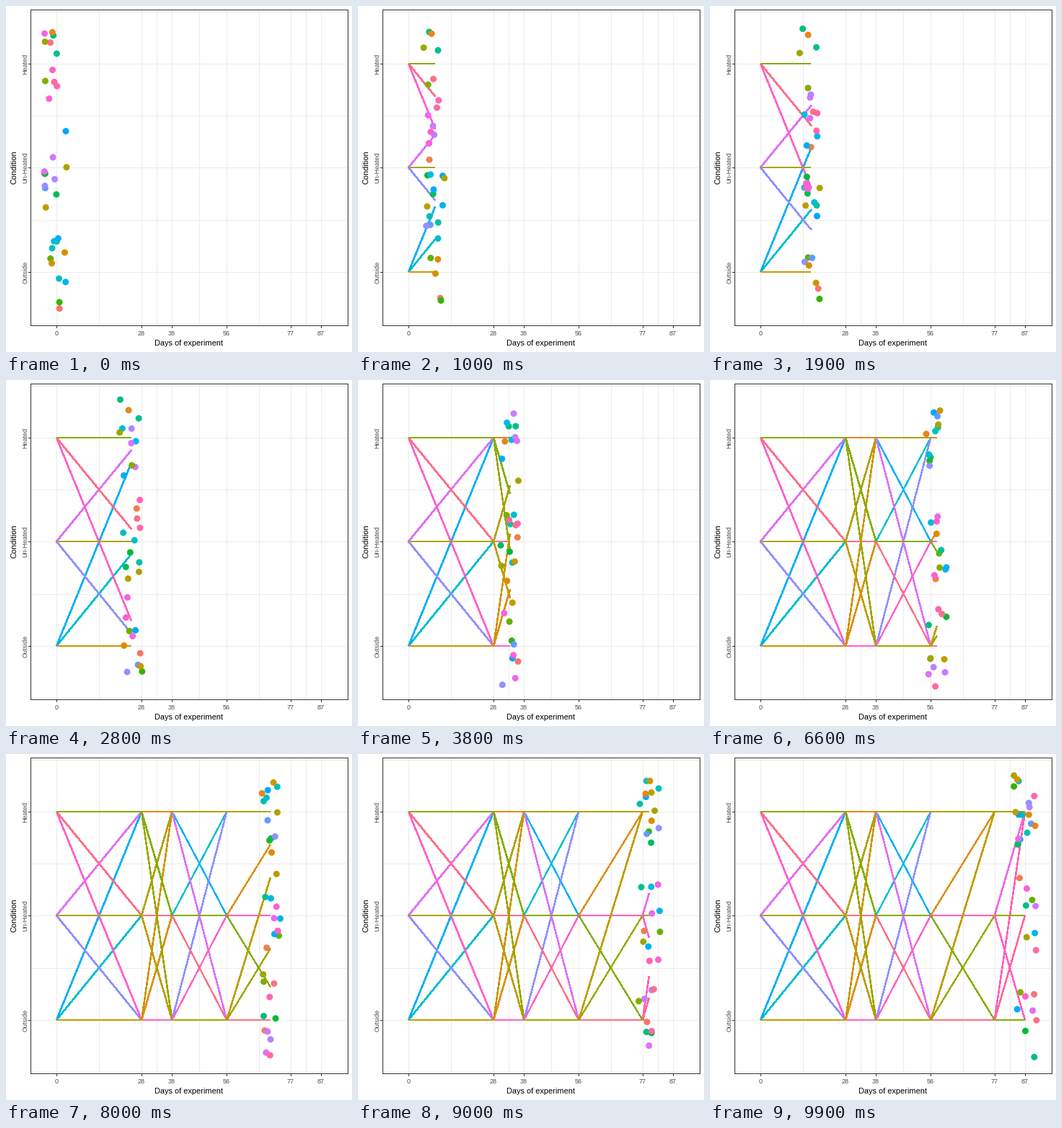
A matplotlib script that plays this animation: 480x480 px, repeating every 10 s.

```python
from itertools import permutations

import numpy as np
import matplotlib.pyplot as plt
from matplotlib.animation import FuncAnimation
from matplotlib.collections import LineCollection
from matplotlib.patches import Rectangle

SIZE, DPI, FRAMES = 480, 80, 100
PT = 72 / DPI  # points per pixel
VISITS = np.array([0, 28, 38, 56, 77, 87])
LEGS = range(len(VISITS) - 1)
ROWS = {"O": 369, "U": 224, "H": 80}
NAMES = {"O": "Outside", "U": "Un-Heated", "H": "Heated"}
LEFT, RIGHT, TOP, BOTTOM = 34, 474, 5, 443


def day_x(day):
    return 70 + 367 / 87 * np.asarray(day, float)


def make_paths():
    """Condition of every subject at the six visits, by cohort."""
    fixed = [c * 6 for c in "OUH"]
    late = [a * 3 + b * 3 for a, b in permutations("OUH", 2)]
    early, crossed = [], []
    for a, b, c in permutations("OUH"):
        end = "H" if b == "H" else c  # heated ones stay heated
        early.append(a * 2 + b * 2 + end * 2)
        last = "HHH" if c == "H" else "HUO"
        crossed += [a + b * 2 + c * 2 + d for d in last]
    return fixed + early + late + crossed


def hcl(hue, chroma=100, lum=65):
    """Polar LUV colour as sRGB."""
    h = np.radians(hue)
    u = chroma * np.cos(h) / (13 * lum) + 0.1978
    v = chroma * np.sin(h) / (13 * lum) + 0.4683
    y = ((lum + 16) / 116) ** 3
    x = 9 * y * u / (4 * v)
    z = -x / 3 - 5 * y + 3 * y / v
    rgb = np.array([
        3.2405 * x - 1.5371 * y - 0.4985 * z,
        -0.9693 * x + 1.8760 * y + 0.0416 * z,
        0.0556 * x - 0.2040 * y + 1.0572 * z,
    ]).clip(0, 1)
    return np.where(rgb > 0.00304, 1.055 * rgb ** (1 / 2.4) - 0.055, 12.92 * rgb)


paths = make_paths()
count = len(paths)
order = [0, 1, *range(9, count), *range(2, 9)]  # bottom to top
colors = np.array([hcl(15 + 360 * i / count) for i in order])
visit_x = day_x(VISITS)
levels = np.array([[ROWS[c] for c in paths[i]] for i in order], float)

# Dots: jittered around each visit, straight moves in between
rng = np.random.default_rng(7)
spots = np.stack([
    visit_x + rng.uniform(-16.9, 16.9, levels.shape),
    levels + rng.uniform(-57.8, 57.8, levels.shape),
], axis=-1)


def line_width(k, row):
    slope = abs(row[k + 1] - row[k]) / (visit_x[k + 1] - visit_x[k])
    if slope == 0:
        return 2 * PT
    return (1.1 if 1.5 < slope < 2 else 1.5) * PT


leg_colors = np.tile(colors, (len(LEGS), 1))
leg_widths = np.array([line_width(k, row) for k in LEGS for row in levels])

fig = plt.figure(figsize=(SIZE / DPI, SIZE / DPI), dpi=DPI, facecolor="white")
ax = fig.add_axes([0, 0, 1, 1])
ax.set_xlim(0, SIZE)
ax.set_ylim(SIZE, 0)
ax.axis("off")


def rule(xs, ys, color, z):
    ax.plot(xs, ys, color=color, lw=PT, zorder=z, antialiased=False,
            solid_capstyle="butt")


def label(x, y, text, size, color, rotation=0):
    ax.text(x, y, text, fontsize=size * PT, color=color, rotation=rotation,
            family="Liberation Sans", ha="center", va="baseline",
            rotation_mode="anchor")


minor_x = day_x((VISITS[1:] + VISITS[:-1]) / 2)
for x in np.round([*visit_x, *minor_x]):
    rule([x, x], [TOP, BOTTOM], "#ebebeb", 0)
for y in [*ROWS.values(), 8, 152, 297, 441]:
    rule([LEFT, RIGHT], [y, y], "#ebebeb", 0)

ax.add_patch(Rectangle((LEFT, TOP), RIGHT - LEFT, BOTTOM - TOP, fill=False,
                       ec="#333333", lw=PT, zorder=4, antialiased=False))
for x, day in zip(np.round(visit_x), VISITS):
    rule([x, x], [BOTTOM, BOTTOM + 3], "#333333", 4)
    label(x, 457, str(day), 9, "#4d4d4d")
for key, y in ROWS.items():
    rule([LEFT - 3, LEFT], [y, y], "#333333", 4)
    label(29.5, y + 0.5, NAMES[key], 9, "#4d4d4d", 90)
label(254, 471, "Days of experiment", 11, "black")
label(15, 223.5, "Condition", 11, "black", 90)

trails = LineCollection([], antialiaseds=False, capstyle="butt", zorder=2)
ax.add_collection(trails, autolim=False)
dots = ax.scatter(*spots[:, 0].T, s=(9 * PT) ** 2, c=colors, linewidths=0,
                  zorder=3)


def progress(k, day):
    return min(1, (day - VISITS[k]) / (VISITS[k + 1] - VISITS[k]))


def trail_segments(day):
    segments = []
    for k in LEGS:
        if VISITS[k] >= day:
            break
        part = progress(k, day)
        x0, y0 = visit_x[k], levels[:, k]
        x1 = x0 + part * (visit_x[k + 1] - x0)
        y1 = y0 + part * (levels[:, k + 1] - y0)
        segments += [[(x0, a), (x1, b)] for a, b in zip(y0, y1)]
    return segments


def dot_places(day):
    k = max(j for j in LEGS if VISITS[j] <= day)
    return spots[:, k] + progress(k, day) * (spots[:, k + 1] - spots[:, k])


def draw(frame):
    day = VISITS[-1] * frame / (FRAMES - 1)
    segments = trail_segments(day)
    trails.set_segments(segments)
    if segments:
        trails.set_color(leg_colors[:len(segments)])
        trails.set_linewidth(leg_widths[:len(segments)])
    dots.set_offsets(dot_places(day))
    return trails, dots


anim = FuncAnimation(fig, draw, frames=FRAMES, interval=100,
                     init_func=lambda: draw(0), repeat=True, repeat_delay=0)
plt.show()
```
